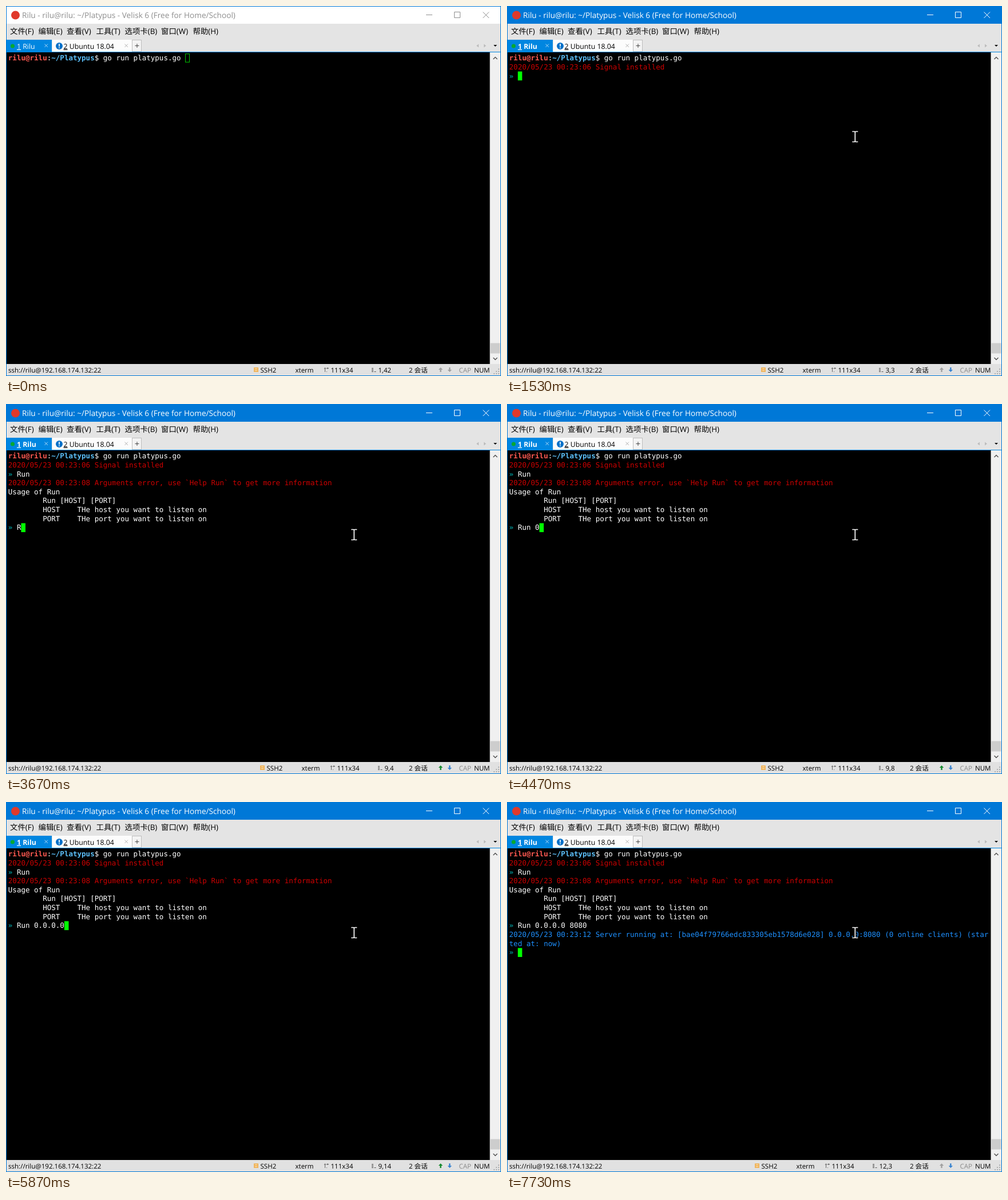
Write an HTML page that moves like this. It is 865 px wide and 647 px high and loops after 8 s.

```html
<!DOCTYPE html>
<html lang="zh-CN">
<head>
<meta charset="utf-8">
<title>Terminal</title>
<style>
html, body { margin: 0; width: 100%; height: 100%; overflow: hidden; background: #000; }
svg { display: block; width: 865px; height: 647px; --p: 0%; }
text { white-space: pre; text-rendering: geometricPrecision; fill: #000;
  font-family: "Open Sans", "Noto Sans CJK SC", "Noto Sans CJK", sans-serif; }
.ui { font-size: 13.4px; }
.tab { font-size: 12.3px; }
.status { font-size: 11.55px; }
.bar { fill: color-mix(in srgb, #0078d7 var(--p), #fff); }
.title { font-size: 13.65px; fill: color-mix(in srgb, #fff var(--p), #8e8e8e); }
.btn { fill: none; stroke: color-mix(in srgb, #fff var(--p), #8e8e8e); }
.u { text-decoration: underline; }
.term text { font: 12.54px "DejaVu Sans Mono", monospace; fill: #fff; }
.term .user { fill: #ff5a52; font-weight: bold; }
.term .path { fill: #5cc0fa; font-weight: bold; }
.term .err { fill: #cd0000; }
.term .mark { fill: #00b4b4; }
.term .info { fill: #1e90ff; }
</style>
</head>
<body>
<svg id="stage" viewBox="0 0 865 647" xmlns="http://www.w3.org/2000/svg">
  <rect width="865" height="647" fill="#0078d7"/>
  <rect class="bar" x="1" y="1" width="863" height="30"/>
  <circle cx="16.5" cy="16" r="7.5" fill="#e0392b"/>
  <text class="title" x="28" y="20.5">Rilu - rilu@rilu: ~/Platypus - Velisk 6 (Free for Home/School)</text>
  <path class="btn" d="M734 15.5h11M783.5 10.5h10v10h-10zM833.5 10.5l10.5 10.5M844 10.5l-10.5 10.5"/>

  <rect x="1" y="31" width="863" height="49" fill="#e4e4e4"/>
  <g id="menu"></g>

  <rect x="1" y="59" width="79" height="22" fill="#0086e0"/>
  <circle cx="11.5" cy="70" r="3.5" fill="#08a830"/>
  <text class="tab" id="tab" x="19" y="74.7" style="fill:#fff"><tspan class="u">1</tspan> Rilu</text>
  <path d="M67.5 66.5l5.5 5.5M73 66.5l-5.5 5.5" stroke="#a8d6f5" fill="none"/>
  <rect x="81" y="59" width="139" height="21" fill="#fcfcfc"/>
  <circle cx="93" cy="70" r="6" fill="#0070c8"/>
  <path d="M93 66v5M93 72.3v1.7" stroke="#fff" stroke-width="1.7"/>
  <text class="tab" x="100.5" y="74.7"><tspan class="u">2</tspan> Ubuntu 18.04</text>
  <path d="M207.5 66.5l5.5 5.5M213 66.5l-5.5 5.5" stroke="#b4b4b4" fill="none"/>
  <rect x="220.5" y="59.5" width="16" height="20" fill="#f4f4f4" stroke="#bdbdbd"/>
  <path d="M225.5 69.5h7M229 66v7" stroke="#444" fill="none"/>
  <path d="M826 66.5v6l-4-3zM835 66.5v6l4-3z" fill="#bcbcbc"/>
  <path d="M852 68h6l-3 3z"/>
  <rect x="0" y="80" width="865" height="1" fill="#0086e0"/>

  <rect x="1" y="81" width="845" height="545"/>
  <g id="term" class="term"></g>

  <rect x="845.5" y="81" width="18.5" height="545" fill="#f0f0f0"/>
  <rect x="846.5" y="589.5" width="17" height="18" fill="#cdcdcd"/>
  <path d="M851.5 93l3.5-3.5 3.5 3.5M851.5 615l3.5 3.5 3.5-3.5" fill="none" stroke="#505050" stroke-width="1.4"/>

  <rect x="1" y="626" width="863" height="20" fill="#e1e1e1"/>
  <text class="status" x="4" y="640.7">ssh://rilu@192.168.174.132:22</text>
  <g id="info">
    <rect x="433" y="632" width="8" height="8" fill="#efb45c"/>
    <path d="M435 634.5h4M435 637.5h4" stroke="#fae3bd"/>
    <text class="status" x="444.5" y="640.7">SSH2</text>
    <text class="status" x="505.5" y="640.7">xterm</text>
    <path d="M557.5 640v-7M556 634.5l1.500-2 1.500 2M560 633.5h4M562 632v3M560 639.5h1" fill="none" stroke="#666"/>
    <text class="status" x="567.5" y="640.7">111x34</text>
    <path d="M639 633.5h3M639 635.5h3M639 637.5h3M639 639.5h3M643.5 639.5h3" stroke="#555"/>
    <text class="status" id="pos" x="650.5" y="640.7"></text>
  </g>
  <text class="status" x="704" y="640.7">2 会话</text>
  <path id="up" d="M759.5 632l3.7 4h-2.5v4h-2.4v-4h-2.5z"/>
  <path id="down" d="M775.3 640l3.7-4h-2.5v-4h-2.4v4h-2.5z"/>
  <text class="status" x="791.5" y="640.7" style="fill:#8a8a8a">CAP</text>
  <text class="status" x="818" y="640.7">NUM</text>
  <path d="M852 643h2M856 643h2M860 643h2M856 639h2M860 639h2M860 635h2" stroke="#b0b0b0" stroke-width="2"/>

  <g id="mouse" fill="none" transform="translate(608.3 219.5)">
    <path d="M-5 0h4l1 1 1-1h4M0 1v16M-5 18h4l1-1 1 1h4" stroke="#000" stroke-width="3.5"/>
    <path d="M-5 0h4l1 1 1-1h4M0 1v16M-5 18h4l1-1 1 1h4" stroke="#fff" stroke-width="1.7"/>
  </g>
</svg>
<script>
const LOOP = 8000, CELL = 7.55, ROW = 15.65, LEFT = 3.8, TOP = 83.2;
const $ = id => document.getElementById(id);

const MENU = [[7, '文件(F)'], [56.5, '编辑(E)'], [106, '查看(V)'], [157.5, '工具(T)'],
  [207.5, '选项卡(B)'], [271, '窗口(W)'], [326.5, '帮助(H)']];
$('menu').innerHTML = MENU.map(([x, s]) => `<text class="ui" x="${x}" y="49.3">${s}</text>`).join('');

// Each line is a list of [text, class] spans.
const SHELL = [['rilu@rilu', 'user'], [':', ''], ['~/Platypus', 'path'], ['$ ', '']];
const MARK = [['» ', 'mark']];
const CMD = 'go run platypus.go ';
const LOG = [
  [...SHELL, [CMD, '']],
  [['2020/05/23 00:23:06 Signal installed', 'err']],
  [...MARK, ['Run', '']],
  [['2020/05/23 00:23:08 Arguments error, use `Help Run` to get more information', 'err']],
  [['Usage of Run', '']],
  [['        Run [HOST] [PORT]', '']],
  [['        HOST    THe host you want to listen on', '']],
  [['        PORT    THe port you want to listen on', '']],
  [...MARK, ['Run 0.0.0.0 8080', '']],
  [['2020/05/23 00:23:12 Server running at: [bae04f79766edc833305eb1578d6e028] 0.0.0.0:8080 (0 online clients) (star', 'info']],
  [['ted at: now)', 'info']]
];

// [time, finished lines, typed input (null = no prompt), sending]
const STEPS = [
  [0, 0, CMD, 0], [130, 0, CMD, 0], [200, 0, CMD, 0], [270, 0, CMD, 0],
  [870, 1, null, 1], [1070, 1, null, 0], [1530, 2, '', 0],
  [2000, 2, '', 1], [2070, 2, 'R', 1], [2270, 2, 'Ru', 1], [2400, 2, 'Run', 1],
  [2530, 2, 'Run ', 1], [2670, 2, 'Run ', 0],
  [3200, 8, '', 1], [3400, 8, '', 0], [3600, 8, '', 1], [3670, 8, 'R', 1],
  [3930, 8, 'Ru', 1], [4070, 8, 'Run', 1], [4270, 8, 'Run ', 1],
  [4470, 8, 'Run 0', 1], [4600, 8, 'Run 0.', 1], [4670, 8, 'Run 0.', 0],
  [4730, 8, 'Run 0.', 1], [4800, 8, 'Run 0.0', 1], [4870, 8, 'Run 0.0.', 1],
  [5000, 8, 'Run 0.0.0', 1], [5070, 8, 'Run 0.0.0.', 1], [5200, 8, 'Run 0.0.0.', 0],
  [5470, 8, 'Run 0.0.0.', 1], [5530, 8, 'Run 0.0.0.0', 1], [5730, 8, 'Run 0.0.0.0', 0],
  [5870, 8, 'Run 0.0.0.0', 1], [5930, 8, 'Run 0.0.0.0 ', 1], [6130, 8, 'Run 0.0.0.0 8', 1],
  [6270, 8, 'Run 0.0.0.0 88', 1], [6400, 8, 'Run 0.0.0.0 880', 1], [6530, 8, 'Run 0.0.0.0 880', 0],
  [6800, 8, 'Run 0.0.0.0 880', 1], [6870, 8, 'Run 0.0.0.0 88', 1], [6930, 8, 'Run 0.0.0.0 8', 1],
  [7200, 8, 'Run 0.0.0.0 80', 1], [7330, 8, 'Run 0.0.0.0 808', 1], [7400, 8, 'Run 0.0.0.0 8080', 1],
  [7600, 9, null, 1], [7730, 11, '', 0]
];
const FOCUS = [0, 45, 80, 100];

const line = (spans, row) => `<text x="${LEFT}" y="${TOP + 12 + row * ROW}">` +
  spans.map(([s, c]) => `<tspan class="${c}">${s}</tspan>`).join('') + '</text>';

function show(i) {
  const [time, count, input, sending] = STEPS[i];
  const focused = i > 0;
  const rows = LOG.slice(0, count);
  let col = 0;
  if (input !== null) {
    const current = [...(count ? MARK : SHELL), [input, '']];
    col = current.reduce((n, [s]) => n + s.length, 0);
    rows.push(current);
  }
  const x = LEFT + col * CELL, y = TOP + count * ROW;
  const cursor = focused
    ? `<rect x="${x}" y="${y}" width="${CELL}" height="${ROW}" fill="#0f0"/>`
    : `<rect x="${x + 0.2}" y="${y + 0.5}" width="7" height="14.5" fill="none" stroke="#00c800"/>`;
  $('term').innerHTML = rows.map(line).join('') + cursor;

  const pos = `${count + 1},${col + 1}`;
  $('pos').textContent = pos;
  $('info').setAttribute('transform', `translate(${pos.length < 4 ? 11 : 0} 0)`);
  $('up').style.fill = sending ? '#148a2c' : '#a0a0a0';
  $('down').style.fill = time >= 870 ? '#3a84d0' : '#a0a0a0';
  $('mouse').style.visibility = focused ? 'visible' : 'hidden';
  $('tab').style.fontWeight = focused ? 700 : 400;
  $('stage').style.setProperty('--p', FOCUS[Math.min(i, 3)] + '%');
}

let shown = -1;
function tick() {
  const t = performance.now() % LOOP;
  const i = STEPS.findLastIndex(s => s[0] <= t);
  if (i !== shown) show(shown = i);
  requestAnimationFrame(tick);
}
tick();
</script>
</body>
</html>
```
